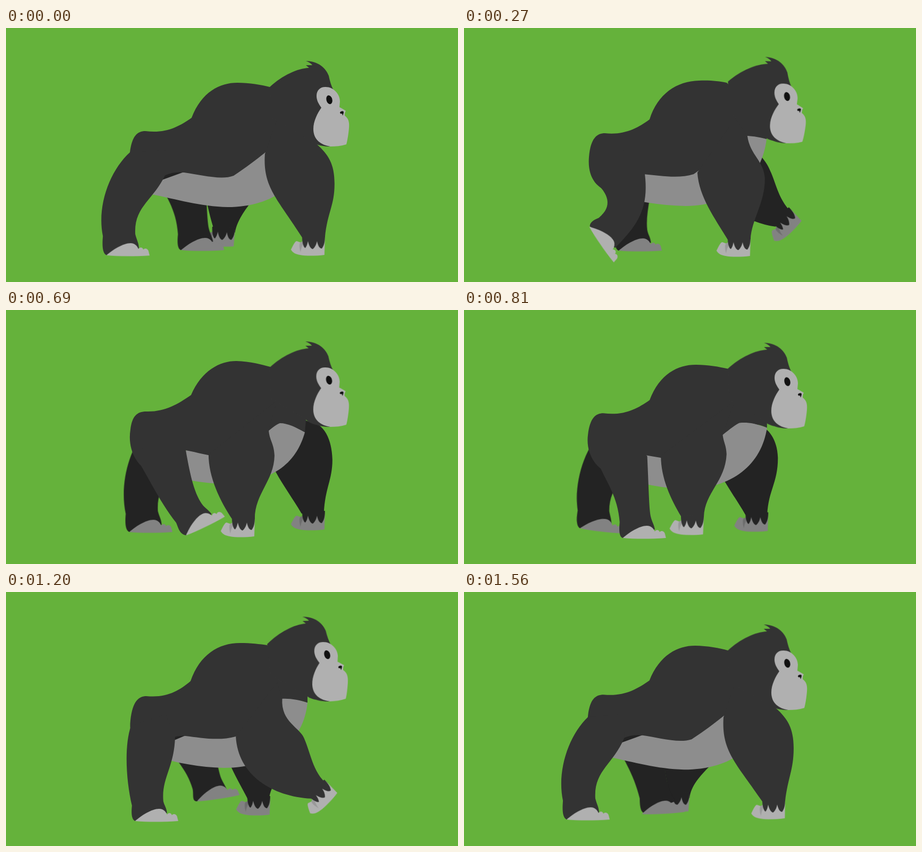
Write an HTML page without scripts that moves like this. It is 850 px wide and 478 px high and loops after 1.59 s.

```html
<!DOCTYPE html>
<html lang="en">
<head>
<meta charset="utf-8">
<title>Walking gorilla</title>
<style>
html, body { margin: 0; height: 100%; overflow: hidden; background: #65b23b; }
svg { display: block; width: 100vw; height: 100vh; }

.near { --fur: #333; --skin: #b0b0b0; --shade: #999; }
.far { --fur: #232323; --skin: #828282; --shade: #6e6e6e; }
.fur { fill: var(--fur); }
.skin { fill: var(--skin); }
.shade { fill: var(--shade); }

.leg, .foot, .arm, .hand { animation: 1.59s linear infinite; }
.torso, .belly, .head { animation: .795s linear infinite; }
.leg { animation-name: leg; }
.foot { animation-name: foot; }
.far .leg, .far .foot { animation-delay: -.795s; }
.near .arm { animation-name: near-arm; }
.near .hand { animation-name: near-hand; }
.far .arm { animation-name: far-arm; }
.far .hand { animation-name: far-hand; }
.torso { animation-name: torso; fill: #333; }
.belly { animation-name: belly; fill: #8d8d8d; }
.head { animation-name: head; transform-origin: 608px 135px; }

@keyframes leg {
  0%, 100% { d: path("M233,234 C195,268 170,335 182,392 C181,405 180,424 189,428 L250,415 C250,405 246,400 243,388 C240,335 277,325 300,275 L300,230Z"); }
  10.38% { d: path("M236,250 C225,300 250,335 216,354 C205,356 198,358 197,364 L234,414 C243,410 252,405 260,400 C290,375 310,330 318,275 L300,230Z"); }
  16.98% { d: path("M245,288 C272,312 280,335 253,357 C240,362 236,367 236,373 L283,414 C287,411 297,400 305,391 C335,357 346,325 340,275 L300,230Z"); }
  25.47% { d: path("M262,290 C285,318 312,345 322,382 C324,392 320,405 330,405 L386,385 C385,378 380,372 377,365 C370,350 368,320 352,270 L300,230Z"); }
  28.3% { d: path("M270,294 C290,318 320,348 345,378 C352,385 348,400 362,400 L411,361 C408,355 402,350 396,344 C384,328 374,300 360,270 L300,230Z"); }
  43.4% { d: path("M241,272 C262,303 288,360 320,400 C324,408 326,422 339,424 L387,384 C384,379 378,375 371,368 C355,348 347,315 338,264 L300,230Z"); }
  50% { d: path("M255,292 C270,325 292,350 295,399 C294,410 293,427 301,429 L361,413 C360,405 356,400 353,388 C350,372 349,345 346,275 L300,230Z"); }
  60.38% { d: path("M244,286 C252,325 264,360 272,402 C271,414 270,427 278,429 L339,414 C338,403 333,398 332,388 C328,365 335,310 331,275 L300,230Z"); }
  75.47% { d: path("M235,252 C222,290 226,355 237,402 C236,412 235,428 243,431 L303,416 C302,406 298,402 296,394 C292,350 317,330 318,272 L300,230Z"); }
}
@keyframes foot {
  0%, 100% { transform: translate(189px, 428px) rotate(0deg); }
  10.38% { transform: translate(197px, 364px) rotate(70deg); }
  16.98% { transform: translate(235px, 374px) rotate(56deg); }
  25.47% { transform: translate(330px, 405px) rotate(-8deg); }
  28.3% { transform: translate(362px, 400px) rotate(-24deg); }
  43.4% { transform: translate(339px, 424px) rotate(-26deg); }
  48.11% { transform: translate(306px, 429px) rotate(-3deg); }
  50% { transform: translate(301px, 429px) rotate(0deg); }
  60.38% { transform: translate(278px, 429px) rotate(0deg); }
  75.47% { transform: translate(243px, 431px) rotate(0deg); }
}

@keyframes near-arm {
  0%, 100% { d: path("M487,237 C483,300 510,320 557,394 L600,394 C605,345 618,335 618,293 C618,255 606,238 585,219 L510,170Z"); }
  16.98% { d: path("M439,272 C442,318 472,358 496,398 L539,398 C541,360 566,330 566,284 C565,250 538,240 533,203 L510,170Z"); }
  28.3% { d: path("M411,273 C411,310 438,360 461,397 L503,397 C505,350 535,335 535,281 C535,245 514,238 515,203 L510,170Z"); }
  43.4% { d: path("M381,272 C381,315 403,360 425,393 L468,393 C468,345 504,322 505,274 C504,250 495,245 494,225 L510,170Z"); }
  60.38% { d: path("M357,277 C357,320 372,352 389,385 L430,385 C434,340 476,325 480,268 C480,258 478,252 477,243 L510,170Z"); }
  75.47% { d: path("M432,272 C436,345 500,385 574,389 L611,367 C577,345 575,310 560,275 C552,255 516,245 519,201 L510,170Z"); }
  83.96% { d: path("M456,258 C470,300 555,345 613,369 L652,360 C632,325 636,300 628,280 C620,235 610,222 580,212 L510,170Z"); }
  87.42% { d: path("M462,252 C475,290 560,345 608,378 L649,376 C637,330 642,310 636,288 C630,240 618,222 590,212 L510,170Z"); }
  98.11% { d: path("M488,236 C484,300 512,322 561,394 L604,394 C609,350 620,335 620,294 C620,256 608,238 587,219 L510,170Z"); }
}
@keyframes near-hand {
  0%, 100% { transform: translate(578px, 395px) rotate(0deg); }
  16.98% { transform: translate(517px, 397px) rotate(0deg); }
  28.3% { transform: translate(481px, 396px) rotate(0deg); }
  43.4% { transform: translate(446px, 394px) rotate(0deg); }
  60.38% { transform: translate(408px, 385px) rotate(2deg); }
  75.47% { transform: translate(585px, 371px) rotate(-46deg); }
  83.96% { transform: translate(631px, 361px) rotate(-33deg); }
  87.42% { transform: translate(623px, 370px) rotate(-26deg); }
  98.11% { transform: translate(582px, 394px) rotate(-1deg); }
}

@keyframes far-arm {
  0%, 100% { d: path("M370,285 C376,325 382,352 390,378 L430,385 C434,360 455,335 465,322 C480,300 480,280 480,250 L510,190Z"); }
  16.98% { d: path("M470,280 C480,340 540,368 585,374 L621,352 C590,325 588,295 575,268 C568,250 555,240 545,225 L510,190Z"); }
  24.53% { d: path("M478,245 C490,290 560,325 620,354 L658,342 C640,310 640,290 632,275 C622,235 612,215 590,205 L510,190Z"); }
  28.3% { d: path("M480,240 C495,280 560,325 616,364 L657,362 C645,320 645,300 644,285 C635,240 626,218 600,203 L510,190Z"); }
  43.4% { d: path("M490,240 C488,290 525,330 556,383 L598,383 C600,335 614,320 614,282 C613,250 604,228 588,216 L510,190Z"); }
  60.38% { d: path("M440,270 C442,310 472,345 496,388 L536,388 C538,345 562,330 561,272 C560,260 555,250 550,240 L510,190Z"); }
  75.47% { d: path("M408,270 C410,315 435,350 455,390 L495,390 C497,360 530,330 530,275 C528,255 520,245 515,225 L510,190Z"); }
  98.11% { d: path("M372,285 C376,325 380,352 386,380 L424,388 C426,365 445,345 460,330 C478,310 482,280 482,250 L510,190Z"); }
}
@keyframes far-hand {
  0%, 100% { transform: translate(408px, 378px) rotate(3deg); }
  16.98% { transform: translate(597px, 355px) rotate(-45deg); }
  24.53% { transform: translate(637px, 346px) rotate(-33deg); }
  28.3% { transform: translate(631px, 355px) rotate(-26deg); }
  43.4% { transform: translate(578px, 381px) rotate(0deg); }
  60.38% { transform: translate(516px, 387px) rotate(0deg); }
  75.47% { transform: translate(475px, 387px) rotate(0deg); }
  98.11% { transform: translate(402px, 380px) rotate(2deg); }
}

@keyframes torso {
  0%, 100% { d: path("M274,306 C250,302 228,270 233,234 C237,203 247,194 262,194 C300,199 325,186 349,169 C368,120 402,103 435,103 C458,103 480,107 496,111 L570,180 L570,222 C545,212 530,212 518,213 C505,218 475,247 428,278 C405,287 365,276 335,272 C310,269 295,278 271,294Z"); }
  20.75% { d: path("M278,309 C246,300 231,275 234,243 C237,205 250,197 264,197 C302,202 330,188 350,173 C367,122 403,102 440,102 C462,101 480,104 496,107 L568,180 L568,216 C548,210 530,206 518,208 C506,212 478,246 430,277 C402,286 365,280 333,275 C312,273 298,282 275,298Z"); }
  33.96% { d: path("M278,310 C248,302 232,280 235,243 C238,206 251,198 265,198 C302,202 327,188 349,172 C364,124 400,100 442,99 C462,98 480,100 494,103 L569,175 L569,209 C550,204 533,202 520,203 C505,208 478,243 432,275 C404,284 370,278 337,275 C315,273 298,283 276,299Z"); }
  50.94% { d: path("M276,308 C248,302 230,275 234,242 C238,205 250,196 264,196 C302,200 326,186 347,168 C364,118 400,96 440,96 C460,96 478,98 491,100 L567,170 L567,208 C550,203 535,200 518,201 C505,207 478,240 432,272 C400,281 365,274 338,271 C315,269 298,280 274,297Z"); }
  56.6% { d: path("M274,306 C244,294 228,262 234,225 C238,200 247,192 262,192 C297,195 322,181 347,162 C365,114 398,93 435,93 C458,93 478,97 491,99 L566,170 L565,214 C545,207 530,202 515,203 C500,212 475,243 428,271 C400,277 362,270 338,266 C312,262 295,275 271,294Z"); animation-timing-function: ease-in-out; }
  86.79% { d: path("M270,304 C246,294 228,262 234,225 C237,200 246,191 264,191 C298,192 322,178 348,160 C368,114 402,96 433,96 C460,97 482,103 497,107 L566,185 L562,230 C545,221 530,213 515,213 C500,218 475,248 428,275 C400,281 362,268 338,264 C310,260 292,272 268,290Z"); }
}
@keyframes belly {
  0%, 100% { d: path("M271,294 L420,240 L518,205 L570,222 C560,290 505,337 417,337 C365,336 320,322 274,313Z"); }
  20.75% { d: path("M275,298 L420,240 L518,200 L568,216 C560,285 505,335 417,335 C365,334 320,324 278,310Z"); }
  33.96% { d: path("M276,299 L420,240 L520,195 L569,209 C561,280 505,335 417,335 C368,334 320,326 278,312Z"); }
  50.94% { d: path("M274,297 L420,235 L518,193 L567,208 C560,280 502,331 410,331 C365,330 320,322 276,308Z"); }
  56.6% { d: path("M271,294 L420,235 L515,195 L565,214 C555,265 530,327 410,327 C360,326 320,320 274,307Z"); animation-timing-function: ease-in-out; }
  86.79% { d: path("M268,290 L420,235 L515,205 L562,230 C548,280 510,327 405,327 C358,325 320,316 270,304Z"); }
}
@keyframes head {
  0%, 100% { transform: translate(0px, 0px) rotate(0deg); }
  20.75% { transform: translate(0px, -2px) rotate(1.7deg); }
  33.96% { transform: translate(-.5px, -6px) rotate(2.2deg); }
  50.94% { transform: translate(-4px, -17px) rotate(-2deg); }
  56.6% { transform: translate(-5px, -19px) rotate(-4.1deg); animation-timing-function: ease-in-out; }
  86.79% { transform: translate(-.5px, -3px) rotate(-.3deg); }
}
</style>
</head>
<body>
<svg viewBox="0 0 850 478">
  <defs>
    <path id="foot" class="skin" d="M0,0 C11,-10 31,-23 45,-23 C54,-23 58,-17 60,-12 C63,-17 68,-15 69,-11 C73,-15 78,-12 79,-8 L81,0 C52,2 22,2 0,0Z"/>
    <g id="hand">
      <path class="skin" d="M-42,22 C-37,12 -34,6 -31,6 C-27,7 -24,10 -20,8 L22,0 L21,32 C5,34 -15,34 -25,32 C-32,31 -39,28 -42,22Z"/>
      <path class="shade" d="M-25,9 C-27,15 -25,22 -24,27 C-23,20 -21,15 -18,10 L-20,6Z"/>
      <path class="fur" d="M-21,-3 C-21,10 -18,18 -15,19 C-12,15 -11,11 -10,6 C-8,15 -5,20 -1,21 C4,17 6,11 7,6 C9,15 12,20 16,20 C20,15 22,8 22,-3Z"/>
    </g>
  </defs>

  <g class="far">
    <path class="arm fur"/>
    <g class="hand"><use href="#hand"/></g>
    <g transform="translate(28.5 -11)">
      <path class="leg fur"/>
      <g class="foot"><use href="#foot"/></g>
    </g>
  </g>

  <path class="belly"/>
  <path class="torso"/>

  <g class="near">
    <path class="leg fur"/>
    <g class="foot"><use href="#foot"/></g>
    <path class="arm fur"/>
    <g class="hand"><use href="#hand"/></g>
    <g class="head">
      <path class="fur" d="M496,111 C520,89 548,76 570,75 L564,70 L576,70 C574,67 570,64 564,62 C587,62 602,76 607,90 C609,100 612,110 616,117 L630,190 L610,223 C598,223 590,221 584,219 C575,217 568,214 560,205 L500,170Z"/>
      <path class="skin" d="M600,111 C615,110 628,124 628,138 L627,149 C631,151 635,153 639,156 C637,159 637,162 637,165 C644,170 646,177 645,188 C644,200 642,212 640,219 C630,222 620,223 610,223 C592,220 578,210 578,190 C578,175 586,160 593,150 C588,143 584,136 584,128 C584,117 591,111 600,111Z"/>
      <ellipse cx="608" cy="135" rx="5.5" ry="8.5" transform="rotate(-15 608 135)" fill="#111"/>
      <path fill="#111" d="M628,159 C630,156 634,156 635,158 C635,160 634,163 633,165 L632,161 C630,162 628,161 628,159Z"/>
    </g>
  </g>
</svg>
</body>
</html>
```
